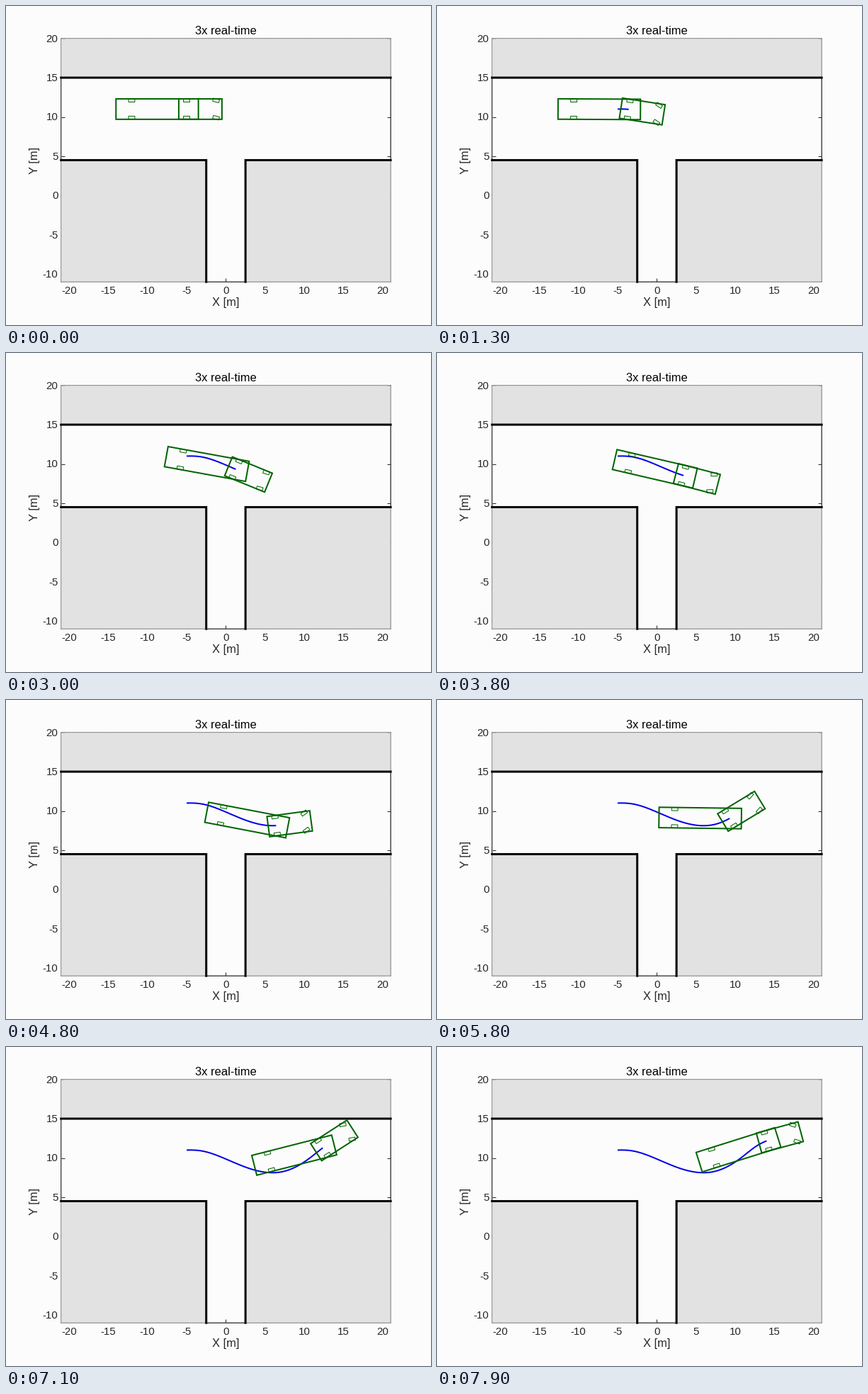
A matplotlib script for the animation above (8000 ms loop, 600x450 px).

```python
import numpy as np
import matplotlib.pyplot as plt
from matplotlib.animation import FuncAnimation

plt.rcParams["font.family"] = "Liberation Sans"
plt.rcParams["path.snap"] = False

W, H = 600, 450
PX = 0.72                                  # one pixel in points at 100 dpi
TICK_MS, TICKS = 100, 80
BACK, GREY, GREEN, BLUE = "#fdfcfd", "#e3e2e3", "#006400", "#0000e6"
DARK, EDGE = "#262626", "#808080"

# Vehicle sizes in metres; the hitch sits slightly behind the pivot
WHEELBASE, TRAILER_LEN, HALF_W, OFFSET = 3.75, 7.0, 1.3, 0.4

# Simulation steps: speed up, cruise, brake
STEPS, CRUISE, RAMP, BRAKE = 32, 0.76, 6.75, 28.28
STARTS = np.round(2.535 * np.arange(STEPS) - 0.025)

# Path curvature: (distance, 1/m), linear in between
TURNS = [(0, -0.075), (1.4, -0.142), (4, -0.035), (12.15, 0.173),
         (16.7, 0.039), (18.7, -0.127), (20.6, -0.202)]


def travelled(step):
    acc = CRUISE / RAMP
    if step < RAMP:
        return acc * step ** 2 / 2
    return CRUISE * (step - RAMP / 2) - acc / 2 * max(step - BRAKE, 0) ** 2


def integrate(rate, ds, start=0.0):
    return start + np.append(0, np.cumsum((rate[1:] + rate[:-1]) / 2) * ds)


def simulate(ds=0.005):
    dist = np.arange(0, travelled(STEPS - 1) + ds, ds)
    curve = np.interp(dist, *zip(*TURNS))
    heading = integrate(curve, ds)
    course = heading - OFFSET * curve
    x = integrate(np.cos(course), ds, -5)
    y = integrate(np.sin(course), ds, 11)
    trailer = np.zeros_like(dist)
    for i in range(1, len(dist)):
        swing = np.sin(course[i - 1] - trailer[i - 1]) / TRAILER_LEN
        trailer[i] = trailer[i - 1] + ds * swing
    steer = np.arctan((WHEELBASE - OFFSET) * curve)
    return dist, x, y, heading, trailer, steer


DIST, X, Y, HEADING, TRAILER, STEER = simulate()


def turn(points, angle, origin):
    c, s = np.cos(angle), np.sin(angle)
    return points @ np.array([[c, s], [-s, c]]) + origin


def box(x0, x1, half):
    return np.array([[x0, -half], [x1, -half], [x1, half], [x0, half]])


def wheel(x, side, angle=0.0):
    return turn(box(-0.4, 0.4, 0.2), angle, (x, side * 1.1))


# Stage
fig = plt.figure(figsize=(W / 100, H / 100), dpi=100, facecolor=BACK)
LEFT, BOTTOM, WIDTH = 77.7, 60.8, 465.4
HEIGHT = WIDTH * 31 / 42
SCALE = WIDTH / 42
ax = fig.add_axes([LEFT / W, BOTTOM / H, WIDTH / W, HEIGHT / H], facecolor=BACK)
ax.set(xlim=(-21, 21), ylim=(-11, 20),
       xticks=range(-20, 21, 5), yticks=range(-10, 21, 5))
ax.set_axisbelow(True)
ax.tick_params(direction="in", length=4.7 * PX, width=PX, color=DARK,
               top=True, right=True, labelbottom=False, labelleft=False)
for spine in ax.spines.values():
    spine.set(color=EDGE, linewidth=PX)


def label(x, y, text, size, color=DARK, **kw):
    fig.text(x / W, 1 - y / H, text, fontsize=size * PX, color=color,
             va="baseline", **kw)


MID_X = LEFT + WIDTH / 2
ZERO_Y = H - BOTTOM - 11 * SCALE
for v in range(-20, 21, 5):
    label(MID_X + v * SCALE, 406.5, str(v), 15, ha="center")
for v in range(-10, 21, 5):
    label(73.5, ZERO_Y - v * SCALE + 5, str(v), 15, ha="right")
label(MID_X, 40, "3x real-time", 16.5, "black", ha="center")
label(MID_X, 423.5, "X [m]", 16.5, ha="center")
label(45.5, H - BOTTOM - HEIGHT / 2, "Y [m]", 16.5, ha="center",
      rotation=90, rotation_mode="anchor")

# Road: blocked areas, open borders, walls
for xs, ys in [((-21, 21), (15, 20)), ((-21, -2.5), (-11, 4.5)),
               ((2.5, 21), (-11, 4.5))]:
    ax.fill_between(xs, *ys, color=GREY, linewidth=0, zorder=1)
for xs, ys in [((-21, -21), (4.5, 15)), ((21, 21), (4.5, 15)),
               ((-2.5, 2.5), (-11, -11))]:
    ax.plot(xs, ys, color=DARK, lw=PX, clip_on=False, zorder=3)
for xs, ys in [((-21, 21), (15, 15)),
               ((-21, -2.5, -2.5), (4.5, 4.5, -11)),
               ((21, 2.5, 2.5), (4.5, 4.5, -11))]:
    ax.plot(xs, ys, color="black", lw=3 * PX, clip_on=False, zorder=4,
            solid_capstyle="projecting", solid_joinstyle="miter")

# Moving parts
trace, = ax.plot([], [], color=BLUE, lw=2 * PX, zorder=5,
                 solid_capstyle="butt")


def outline(width):
    return ax.add_patch(plt.Polygon(np.zeros((4, 2)), fill=False, ec=GREEN,
                                    lw=width * PX, joinstyle="miter", zorder=6))


bodies = [outline(2) for _ in range(2)]
wheels = [outline(1) for _ in range(6)]


def draw(tick):
    step = np.searchsorted(STARTS, tick, "right") - 1
    i = np.searchsorted(DIST, travelled(step))
    hitch = X[i], Y[i]
    trace.set_data(X[:i + 1], Y[:i + 1])

    bodies[0].set_xy(turn(box(-9, 1.5, HALF_W), TRAILER[i], hitch))
    bodies[1].set_xy(turn(box(-1, 4.5, HALF_W), HEADING[i], hitch))
    for n, side in enumerate((-1, 1)):
        front = wheel(WHEELBASE, side, STEER[i])
        wheels[n].set_xy(turn(wheel(-TRAILER_LEN, side), TRAILER[i], hitch))
        wheels[n + 2].set_xy(turn(wheel(0, side), HEADING[i], hitch))
        wheels[n + 4].set_xy(turn(front, HEADING[i], hitch))
    return [trace, *bodies, *wheels]


anim = FuncAnimation(fig, draw, frames=TICKS, interval=TICK_MS,
                     repeat=True, repeat_delay=0, blit=False)
plt.show()
```
